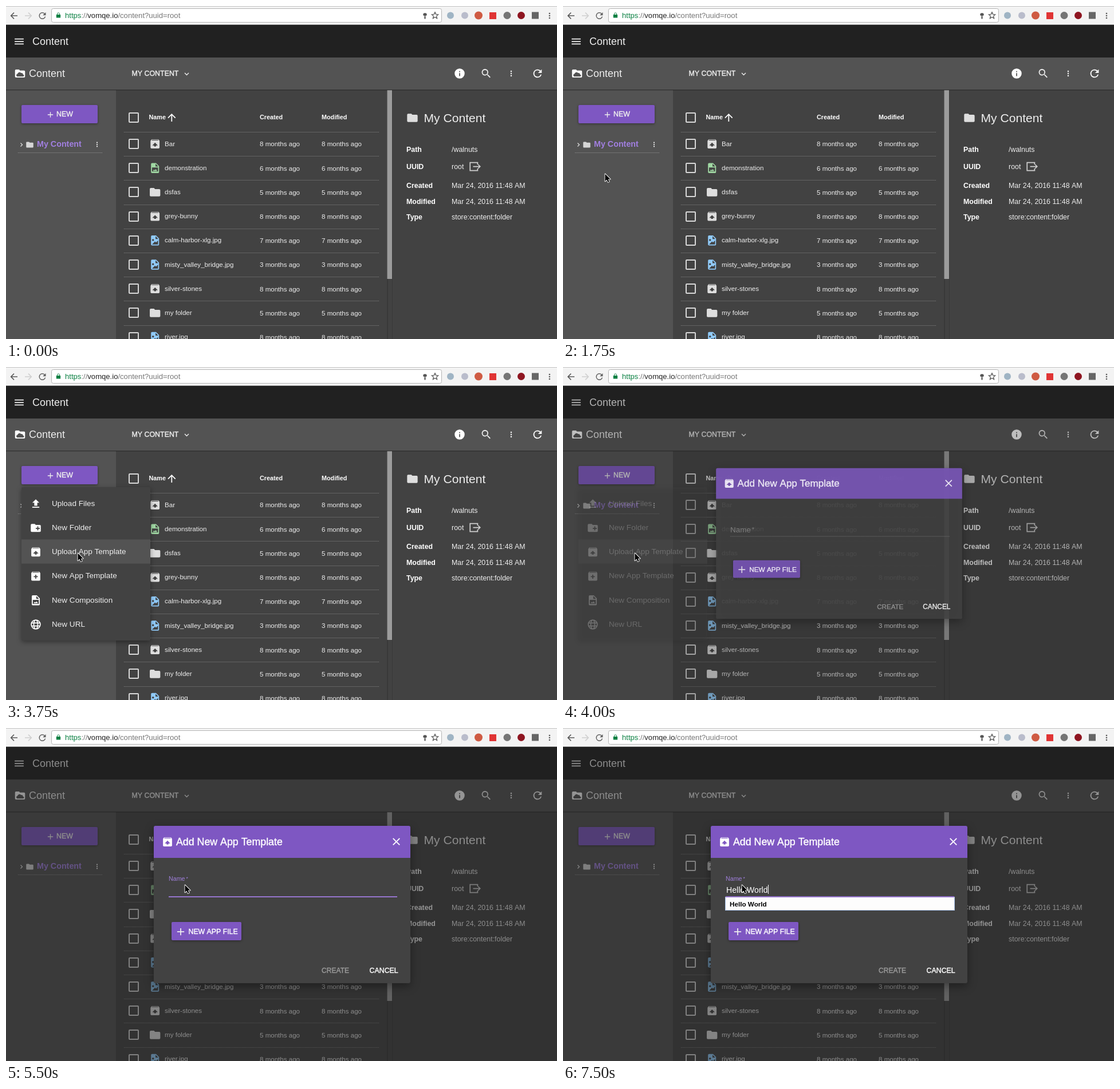
An HTML page with a canvas that plays this animation: 962x582 px, repeating every 8000 ms.

```html
<!DOCTYPE html>
<html lang="en">
<head>
<meta charset="utf-8">
<title>Content manager</title>
<style>
  html, body { margin: 0; width: 100%; height: 100%; overflow: hidden; background: #424242; }
  canvas { display: block; width: 962px; height: 582px; }
</style>
</head>
<body>
<canvas id="stage" width="962" height="582"></canvas>
<script>
const ctx = document.getElementById('stage').getContext('2d');
const LOOP = 8000, STEP = 250, ROW = 42.2;
const PURPLE = '#7e57c2', LIGHT = '#eeeeee', PANEL = '#424242', SIDE = '#535353';

// Icons on a 24 unit grid
const FOLDER = 'M10 4H4a2 2 0 0 0-2 2v12a2 2 0 0 0 2 2h16a2 2 0 0 0 2-2V8a2 2 0 0 0-2-2h-8z';
const BOX = 'M5 3h14l2 3v13a2 2 0 0 1-2 2H5a2 2 0 0 1-2-2V6zM5.2 5h13.6l-.8-1H6z';
const DOC = 'M6 2h8l6 6v12a2 2 0 0 1-2 2H6a2 2 0 0 1-2-2V4a2 2 0 0 1 2-2zM13 3.5V9h5.5z';
const shapes = {
  folder: FOLDER,
  folderPlus: FOLDER + 'M15 9v3h-3v2h3v3h2v-3h3v-2h-3V9z',
  folderImage: FOLDER + 'M6 18a3 3 0 0 1 1-5.5a4 4 0 0 1 7-1.5a3 3 0 0 1 4 3a2 2 0 0 1 0 4z',
  box: BOX + 'M12 9.5l5.5 5.5H14v2h-4v-2H6.5z',
  boxPlus: BOX + 'M11 9v3H8v2h3v3h2v-3h3v-2h-3V9z',
  image: DOC + 'M6 20h12v-8l-4 4-2-2zM6 11a2 2 0 1 0 4 0a2 2 0 1 0-4 0z',
  composition: DOC + 'M6 11h12v8H6zM7.5 18h9l-3-4-2 2.5-1.5-1.5z',
  upload: 'M9 16v-6H5l7-7 7 7h-4v6zM5 18h14v2H5z',
  refresh: 'M17.65 6.35A8 8 0 1 0 19.73 14h-2.08A6 6 0 1 1 12 6c1.66 0 3.14.69 4.22 1.78L13 11h7V4z',
  search: 'M15.5 14h-.8l-.3-.3A6.5 6.5 0 1 0 13.7 14.4l.3.3v.8l5 5L20.5 19zM9.5 14a4.5 4.5 0 1 1 0-9a4.5 4.5 0 0 1 0 9z',
  info: 'M12 2a10 10 0 1 0 0 20a10 10 0 0 0 0-20zM13 17h-2v-6h2zM13 9h-2V7h2z',
  dots: [6, 12, 18].map(y => `M10 ${y}a2 2 0 1 0 4 0a2 2 0 1 0-4 0z`).join(''),
  menu: 'M3 6h18v2H3zM3 11h18v2H3zM3 16h18v2H3z',
  close: 'M19 6.4L17.6 5 12 10.6 6.4 5 5 6.4 10.6 12 5 17.6 6.4 19 12 13.4 17.6 19 19 17.6 13.4 12z',
  plus: 'M11 5h2v6h6v2h-6v6h-2v-6H5v-2h6z',
  arrowUp: 'M12 4l-8 8 1.4 1.4 5.6-5.6V20h2V7.8l5.6 5.6L20 12z',
  globe: 'M3 12a9 9 0 1 0 18 0a9 9 0 1 0-18 0zM8 12a4 9 0 1 0 8 0a4 9 0 1 0-8 0zM4 9h16M4 15h16',
  exit: 'M17 8V4H2v16h15v-4M8 12h14M18 8l4 4-4 4',
  chevronRight: 'M9 6l6 6-6 6',
  chevronDown: 'M6 9l6 6 6-6',
  back: 'M21 12H4M12 4l-8 8 8 8',
  forward: 'M3 12h17M12 4l8 8-8 8',
  star: 'M12 3l2.7 6 6.3.6-4.8 4.2 1.5 6.4L12 16.9l-5.7 3.3 1.5-6.4L3 9.6 9.3 9z',
  key: 'M6 8a6 5 0 1 0 12 0a6 5 0 1 0-12 0zM10 12h4v10h-4z',
  lock: 'M4 10h16v12H4zM7 10V7a5 5 0 0 1 10 0v3h-2V7a3 3 0 0 0-6 0v3z',
  pointer: 'M0 0V14.2L3.3 11.1L5.6 16L8 15L5.8 10.2H10.2z'
};
const paths = {};
for (const name in shapes) paths[name] = new Path2D(shapes[name]);

function icon(name, x, y, size, color, line = 0) {
  ctx.save();
  ctx.translate(x - size / 2, y - size / 2);
  ctx.scale(size / 24, size / 24);
  ctx.fillStyle = ctx.strokeStyle = color;
  ctx.lineWidth = line;
  if (line) ctx.stroke(paths[name]);
  else ctx.fill(paths[name], 'evenodd');
  ctx.restore();
}

function rect(x, y, w, h, color) {
  ctx.fillStyle = color;
  ctx.fillRect(x, y, w, h);
}

function card(x, y, w, h, color, radius = 2, blur = 4) {
  ctx.save();
  ctx.shadowColor = 'rgba(0,0,0,.38)';
  ctx.shadowBlur = blur;
  ctx.shadowOffsetY = blur / 3;
  ctx.fillStyle = color;
  ctx.beginPath();
  ctx.roundRect(x, y, w, h, radius);
  ctx.fill();
  ctx.restore();
}

function disc(x, y, r, color) {
  ctx.fillStyle = color;
  ctx.beginPath();
  ctx.arc(x, y, r, 0, 7);
  ctx.fill();
}

// Weight 500 is the regular face with a hairline outline
function text(s, x, y, size, color = LIGHT, weight = 400) {
  ctx.font = `${weight === 700 ? 'bold ' : ''}${size}px "Liberation Sans", Arial, sans-serif`;
  ctx.fillStyle = ctx.strokeStyle = color;
  ctx.fillText(s, x, y);
  if (weight === 500) {
    ctx.lineWidth = 0.4;
    ctx.strokeText(s, x, y);
  }
  return x + ctx.measureText(s).width;
}

function dotted(x1, x2, y, color) {
  ctx.strokeStyle = color;
  ctx.lineWidth = 1;
  ctx.setLineDash([1, 1]);
  ctx.beginPath();
  ctx.moveTo(x1, y);
  ctx.lineTo(x2, y);
  ctx.stroke();
  ctx.setLineDash([]);
}

function checkbox(y) {
  ctx.strokeStyle = '#d8d8d8';
  ctx.lineWidth = 2;
  ctx.beginPath();
  ctx.roundRect(215, Math.round(y) - 8, 16, 16, 1);
  ctx.stroke();
}

function drawBrowser() {
  rect(0, 0, 962, 33, '#f3f3f3');
  rect(0, 0, 962, 1, '#c4c4c4');
  rect(0, 32, 962, 1, '#b4b4b4');
  icon('back', 14, 17, 16, '#5a5a5a', 2.4);
  icon('forward', 39, 17, 16, '#d0d0d0', 2.4);
  icon('refresh', 63.5, 17, 18, '#5f5f5f');
  ctx.beginPath();
  ctx.roundRect(79.5, 4.5, 681, 24, 3);
  ctx.fillStyle = '#fff';
  ctx.fill();
  ctx.strokeStyle = '#b5b5b5';
  ctx.lineWidth = 1;
  ctx.stroke();
  icon('lock', 91.5, 16, 11, '#0b8043');
  let x = text('https', 103, 21, 13.1, '#0b8043');
  x = text('://', x, 21, 13.1, '#777');
  x = text('vomqe.io', x, 21, 13.1, '#222');
  text('/content?uuid=root', x, 21, 13.1, '#777');
  icon('key', 731.5, 17, 13, '#555');
  icon('star', 749, 16.5, 15, '#555', 2);
  disc(776, 16.5, 6, '#9fb4c4');
  disc(801, 16.5, 6, '#b9bccb');
  disc(825, 16.5, 7, '#cf5b43');
  rect(844, 11, 12, 12, '#e03434');
  disc(875, 16.5, 6.5, '#757575');
  disc(899.5, 16.5, 6.5, '#8e1520');
  rect(918, 10.5, 12, 12, '#666');
  icon('dots', 949, 17, 16, '#5a5a5a');
}

function drawBars() {
  rect(0, 33, 962, 57, '#212121');
  icon('menu', 23, 62, 21, LIGHT);
  text('Content', 46, 68, 18);
  rect(0, 90, 962, 56, SIDE);
  icon('folderImage', 24.5, 118, 21, '#fff');
  text('Content', 40, 123.6, 18);
  text('MY CONTENT', 219.5, 122.3, 12.4, LIGHT, 500);
  icon('chevronDown', 315.5, 118.7, 14, LIGHT, 2.4);
  icon('info', 792, 118, 21, '#fff');
  icon('search', 838.5, 118, 21, LIGHT);
  icon('dots', 882, 118, 15.5, LIGHT);
  icon('refresh', 928, 118, 22, '#fff');
}

function drawSidebar() {
  rect(0, 146, 192, 436, SIDE);
  card(27, 173, 133, 32, PURPLE);
  icon('plus', 77.5, 190, 16, LIGHT);
  text('NEW', 88, 193.4, 12.4, LIGHT, 500);
  icon('chevronRight', 27, 242.5, 12, '#ddd', 2.6);
  icon('folder', 41.5, 242.5, 15, '#d5d5d5');
  text('My Content', 54, 246, 14.3, '#a17fe0', 700);
  icon('dots', 159, 242, 13.5, LIGHT);
  dotted(21, 169, 256.5, '#929292');
}

const files = [
  ['Bar', 8, 'box'], ['demonstration', 6, 'composition'], ['dsfas', 5, 'folder'],
  ['grey-bunny', 8, 'box'], ['calm-harbor-xlg.jpg', 7, 'image'],
  ['misty_valley_bridge.jpg', 3, 'image'], ['silver-stones', 8, 'box'],
  ['my folder', 5, 'folder'], ['river.jpg', 8, 'image']
];
const tints = { image: '#90caf9', composition: '#a0d8a3' };

function drawList() {
  rect(192, 146, 474, 436, PANEL);
  checkbox(195);
  text('Name', 249.5, 198, 10.8, '#fff', 700);
  icon('arrowUp', 289.3, 195, 21, '#fff');
  text('Created', 443, 198, 10.8, '#fff', 700);
  text('Modified', 551, 198, 10.8, '#fff', 700);
  files.forEach(([name, months, kind], i) => {
    const y = 241 + i * ROW;
    dotted(206, 651, Math.round(y - 21) + 0.5, '#828282');
    checkbox(y);
    icon(kind, 260.2, y, kind === 'folder' ? 22 : 21, tints[kind] || '#dedede');
    text(name, 277, y + 3.6, 11.6);
    text(months + ' months ago', 443, y + 4.4, 11.55);
    text(months + ' months ago', 551, y + 4.4, 11.55);
  });
  rect(665, 146, 10, 436, '#393939');
  rect(667, 146, 7, 436, '#424242');
  rect(665.5, 146, 8.5, 331, '#9c9c9c');
}

function drawDetails() {
  rect(675, 146, 287, 436, PANEL);
  icon('folder', 709.5, 195.5, 22, '#dedede');
  text('My Content', 729.5, 203.4, 21.1);
  [['Path', '/walnuts', 255], ['UUID', 'root', 285], ['Created', 'Mar 24, 2016 11:48 AM', 318.3],
   ['Modified', 'Mar 24, 2016 11:48 AM', 345.7], ['Type', 'store:content:folder', 373]
  ].forEach(([label, value, y]) => {
    text(label, 699, y, 12.4, '#fff', 700);
    text(value, 778, y, 12.4);
  });
  icon('exit', 819, 280.5, 21, '#cfcfcf', 2);
}

function drawPage() {
  drawList();
  drawDetails();
  drawSidebar();
  drawBars();
  rect(0, 146, 962, 1, '#333');
  rect(0, 147, 962, 1, 'rgba(0,0,0,.15)');
}

const menuItems = [
  ['upload', 'Upload Files'], ['folderPlus', 'New Folder'], ['box', 'Upload App Template'],
  ['boxPlus', 'New App Template'], ['composition', 'New Composition'], ['globe', 'New URL']
];

function drawMenu(alpha, active) {
  ctx.save();
  ctx.globalAlpha = alpha;
  card(27, 210, 225, 268, PANEL, 2, 8);
  rect(27, 217 + active * ROW, 225, ROW, SIDE);
  menuItems.forEach(([name, label], i) => {
    const y = 238.5 + i * ROW;
    icon(name, 52, y + 0.5, 21, '#fff', name === 'globe' ? 1.9 : 0);
    text(label, 80, y + 4.3, 13.55);
  });
  ctx.restore();
}

// focus: 0 resting label, 1 floating label with full underline
function drawDialog({ scale, alpha, focus, value, caret, suggest }) {
  ctx.save();
  ctx.globalAlpha = alpha;
  ctx.translate(482, 308.5);
  ctx.scale(scale, scale);
  ctx.translate(-482, -308.5);
  card(258, 171, 448, 275, PANEL, 3, 16);
  ctx.beginPath();
  ctx.roundRect(258, 171, 448, 56, [3, 3, 0, 0]);
  ctx.fillStyle = PURPLE;
  ctx.fill();
  icon('box', 282, 199, 21, '#fff');
  text('Add New App Template', 297, 205, 17.8, '#fff', 500);
  icon('close', 681.5, 198.7, 22, '#fff');

  const labelSize = 14 - 3.3 * focus, labelColor = focus ? '#9f7fdb' : '#888';
  const labelY = 288.3 - 21.8 * focus;
  const end = text('Name', 284, labelY, labelSize, labelColor);
  text('*', end + 2, labelY - 1, labelSize * 0.8, labelColor);
  dotted(284, 683, 295.5, '#808080');
  if (focus) rect(483.5 - 199.5 * focus, 294, 399 * focus, 2, '#9575cd');
  const textEnd = text(value, 285, 287.5, 14.1, '#fff');
  if (caret) rect(Math.round(textEnd) + (value ? 0 : 1), 274, 1, 16, '#fff');

  card(289, 339, 122, 32, PURPLE);
  icon('plus', 305, 356, 21, LIGHT);
  text('NEW APP FILE', 318.5, 359.6, 12.3, '#fff', 500);
  text('CREATE', 551, 428.3, 12.1, '#9a9a9a', 500);
  text('CANCEL', 634.5, 428.3, 12.4, '#fff', 500);

  if (suggest) {
    rect(283, 295, 401, 24, '#a9c3ea');
    rect(284, 296, 399, 22, '#fdfdfd');
    rect(284, 294, 399, 2, '#9575cd');
    text('Hello World', 291, 312, 11.7, '#000', 700);
  }
  ctx.restore();
}

const route = [
  [500, 600, 118], [1250, 195, 336], [1500, 98, 326], [1750, 73, 293], [2250, 84, 200],
  [2750, 84, 200], [3750, 125, 325], [4000, 125, 325], [4750, 308, 275], [5000, 312, 274]
];

function pointerAt(t) {
  const next = route.findIndex(p => p[0] > t);
  if (next < 0) return route[route.length - 1].slice(1);
  const [t0, x0, y0] = route[next - 1], [t1, x1, y1] = route[next];
  const k = (t - t0) / (t1 - t0);
  return [x0 + (x1 - x0) * k, y0 + (y1 - y0) * k];
}

function drawPointer([x, y]) {
  ctx.save();
  ctx.translate(x + 0.5, y + 0.5);
  ctx.scale(0.9, 0.9);
  ctx.lineJoin = 'round';
  ctx.lineWidth = 2;
  ctx.strokeStyle = '#fff';
  ctx.stroke(paths.pointer);
  ctx.fillStyle = '#000';
  ctx.fill(paths.pointer);
  ctx.restore();
}

function render(t) {
  const pointer = t >= 500 ? pointerAt(t) : null;
  const opening = t === 4000;
  drawPage();
  if (t >= 4000) rect(0, 33, 962, 549, `rgba(33,33,33,${opening ? 0.29 : 0.48})`);
  drawBrowser();
  if (t >= 2500 && t <= 4000) {
    const active = Math.max(0, Math.floor((pointer[1] - 217) / ROW));
    drawMenu(opening ? 0.25 : t === 2500 ? 0.6 : 1, active);
  }
  if (t >= 4000) {
    const typed = t < 6000 ? 0 : [2, 5, 7, 9][(t - 6000) / STEP] || 11;
    drawDialog({
      scale: opening ? 0.959 : 1,
      alpha: opening ? 0.84 : 1,
      focus: t < 4750 ? 0 : t < 5000 ? 0.6 : 1,
      value: 'Hello World'.slice(0, typed),
      caret: t >= 4750 && (t < 5500 || t >= 6000),
      suggest: t >= 6000
    });
  }
  if (pointer) drawPointer(pointer);
}

let shown = -1;
function frame() {
  const t = Math.floor(performance.now() % LOOP / STEP) * STEP;
  if (t !== shown) render(shown = t);
  requestAnimationFrame(frame);
}
frame();
</script>
</body>
</html>
```
